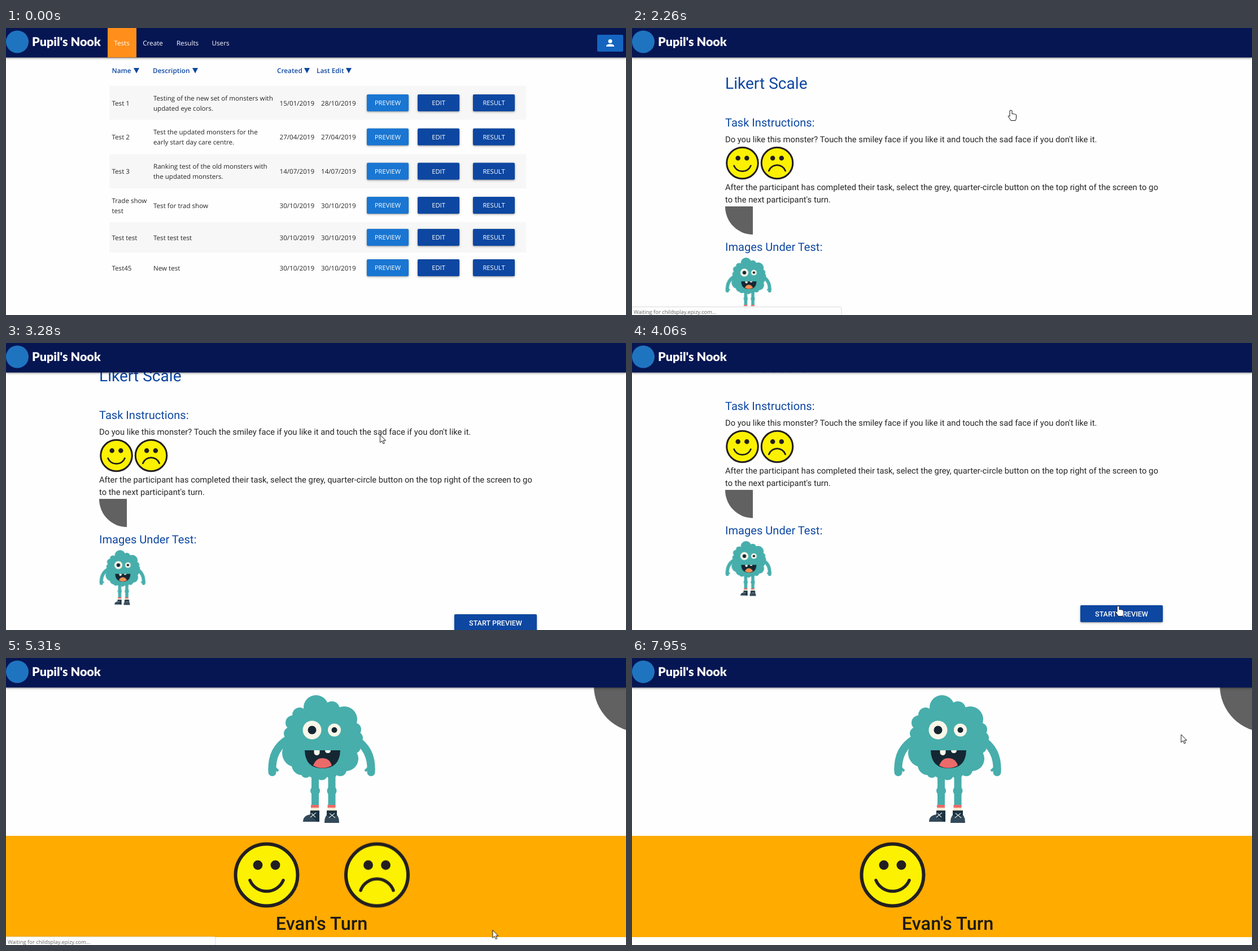
These frames come from a looping animation (1098x510 px, 8000 ms). An HTML page:

```html
<!DOCTYPE html>
<html lang="en">
<head>
<meta charset="utf-8">
<title>Test preview</title>
<style>
  html, body { margin: 0; width: 100%; height: 100%; overflow: hidden; background: #fefefe; }
  svg { display: block; width: 1098px; height: 510px; }
  text { font-family: "Open Sans", sans-serif; font-size: 11.6px; fill: #262626; text-rendering: geometricPrecision; }
  .roboto text { font-family: Roboto, sans-serif; font-size: 14.76px; }
  .mid { text-anchor: middle; }
  text.brand { font: 900 21.5px Lato, sans-serif; fill: #fff; }
  .bar { fill: #061653; filter: drop-shadow(0 1px 1px #0004) drop-shadow(0 1px 2px #0004); }
  .nav text { font-size: 11.7px; fill: #fff; }
  .head text { font-weight: 600; font-size: 11.8px; fill: #0d47a1; }
  .head path { fill: #0d47a1; }
  .btn rect { filter: drop-shadow(0 1px 1px #0004) drop-shadow(0 1px 2px #0003); }
  .btn text { font-weight: 500; font-size: 11.2px; fill: #fff; text-anchor: middle; }
  .roboto .btn text { font-size: 12.6px; }
  .roboto text.h1 { font-size: 28.1px; fill: #0d47a1; }
  .roboto text.h2 { font-size: 20.1px; fill: #0d47a1; }
  .roboto text.turn { font-size: 32.5px; font-weight: 500; fill: #1d1a14; }
  .status text { font-size: 9.4px; fill: #666; }

  .list, .task, .play, .status, .url1, .url2, .wait, .arrow, .hand, .pointer, .sad, .scroll, .hover1 {
    animation: 8s step-end infinite;
  }
  .list { animation-name: list; }
  .task { animation-name: task; }
  .play { animation-name: play; }
  .scroll { animation-name: scroll; }
  .status { animation-name: status; }
  .url1 { animation-name: url1; }
  .url2 { animation-name: url2; }
  .wait { animation-name: wait; }
  .arrow { animation-name: arrow; }
  .hand { animation-name: hand; }
  .pointer { animation-name: pointer; }
  .sad { animation-name: sad; }
  .hover1 { animation-name: hover1; }
  .hover2 { animation: hover2 8s linear infinite; }
  .path { animation: path 8s linear infinite; }

  @keyframes list { 0% { opacity: 1 } 28.25%, 100% { opacity: 0 } }
  @keyframes task { 0% { opacity: 0 } 28.25% { opacity: 1 } 64.75%, 100% { opacity: 0 } }
  @keyframes play { 0% { opacity: 0 } 64.75%, 100% { opacity: 1 } }
  @keyframes scroll {
    0% { transform: none }
    39.875% { transform: translateY(-18px) }
    41% { transform: translateY(-40px) }
    42%, 100% { transform: translateY(-56px) }
  }
  @keyframes status { 0% { opacity: 0 } 14% { opacity: 1 } 32.25% { opacity: 0 } 52.5% { opacity: 1 } 69.5%, 100% { opacity: 0 } }
  @keyframes url1 { 0% { opacity: 1 } 26.375%, 100% { opacity: 0 } }
  @keyframes url2 { 0% { opacity: 0 } 52.5% { opacity: 1 } 60.75%, 100% { opacity: 0 } }
  @keyframes wait { 0% { opacity: 0 } 26.375% { opacity: 1 } 52.5% { opacity: 0 } 60.75%, 100% { opacity: 1 } }
  @keyframes hand { 0% { opacity: 0 } 11.5% { opacity: 1 } 32.25% { opacity: 0 } 50.5% { opacity: 1 } 60.75%, 100% { opacity: 0 } }
  @keyframes arrow { 0% { opacity: 1 } 11.5% { opacity: 0 } 32.25% { opacity: 1 } 50.5% { opacity: 0 } 60.75%, 100% { opacity: 1 } }
  @keyframes pointer { 0% { opacity: 0 } 3.125%, 100% { opacity: 1 } }
  @keyframes sad { 0% { opacity: 1 } 91.75%, 100% { opacity: 0 } }
  @keyframes hover1 { 0% { fill: #1976d2 } 11.5%, 100% { fill: #ff8f1a } }
  @keyframes hover2 {
    0%, 51% { fill: #0d47a1; filter: drop-shadow(0 1px 1px #0004) drop-shadow(0 1px 2px #0003) }
    54%, 100% { fill: #ff9122; filter: drop-shadow(0 2px 2px #0004) drop-shadow(0 1px 3px #0004) }
  }
  @keyframes path {
    0%, 3.125% { transform: translate(974px, 463px); animation-timing-function: ease-out }
    11.875%, 32.25% { transform: translate(671px, 146px) }
    36.125%, 45.875% { transform: translate(662.5px, 163px); animation-timing-function: ease-out }
    50.75% { transform: translate(861px, 467px) }
    55.75%, 66% { transform: translate(866.5px, 487px) }
    70.375%, 71.5% { transform: translate(813px, 447px) }
    74.5% { transform: translate(655px, 374px) }
    77.25%, 80.2% { transform: translate(695px, 361px) }
    80.25% { transform: translate(684.5px, 359px) }
    83%, 84.875% { transform: translate(653px, 373px) }
    85.875%, 95.625% { transform: translate(651px, 376px) }
    99.375%, 100% { transform: translate(972.5px, 136px) }
  }
</style>
</head>
<body>
<svg viewBox="0 0 1098 510">
  <defs>
    <g id="face">
      <circle r="55" fill="#fbf100" stroke="#231f20" stroke-width="6"/>
      <circle cx="-15.5" cy="-17.5" r="5.7" fill="#231f20"/>
      <circle cx="15.5" cy="-17.5" r="5.7" fill="#231f20"/>
    </g>
    <g id="happy" fill="none" stroke="#231f20" stroke-width="5.5" stroke-linecap="round">
      <use href="#face"/>
      <path d="M-29.5 9.5A32 32 0 0 0 29.5 9.5"/>
    </g>
    <g id="unhappy" fill="none" stroke="#231f20" stroke-width="5.5" stroke-linecap="round">
      <use href="#face"/>
      <path d="M-29 27.5A30.800 30.800 0 0 1 29 27.5"/>
    </g>
    <g id="arm" fill="none" stroke="#47aeac">
      <path d="M500 144Q470 162 471.500 200" stroke-width="14"/>
      <path d="M471.500 196V203" stroke-width="14" stroke-linecap="round"/>
      <path d="M474 193L482 201" stroke-width="4.500"/>
    </g>
    <g id="leg">
      <path d="M541 200H554V262H541Z" fill="#47aeac"/>
      <circle cx="547.5" cy="236" r="8.5" fill="#47aeac"/>
      <path d="M540 261H554V266H540Z" fill="#ec6a6a"/>
      <path d="M540 266H554V271H540Z" fill="#f3ead0"/>
    </g>
    <g id="monster">
      <use href="#arm"/>
      <use href="#arm" transform="matrix(-1 0 0 1 1118 0)"/>
      <use href="#leg"/>
      <use href="#leg" x="29.5"/>
      <path d="M539 271H555V291H526Q526 280 539 278Z" fill="#33495a"/>
      <path d="M539 271H555V291H551L539 279Z" fill="#1d3342"/>
      <path d="M568 271H586V279Q590 283 590 293H564Q564 283 568 279Z" fill="#33495a"/>
      <path d="M568 271H586V279L577 284 568 279Z" fill="#1d3342"/>
      <path d="M539 283L549 275M541 276L548 283M573 276L583 284M582 276L572 284" fill="none" stroke="#d9e2e0" stroke-width="1.2"/>
      <g id="fluff" fill="#47aeac"><ellipse cx="559" cy="150" rx="61" ry="58"/></g>
      <circle cx="542" cy="128" r="16.500" fill="#f8f6e8"/>
      <circle cx="542" cy="128" r="7.500" fill="#152733"/>
      <circle cx="581.500" cy="128" r="11.500" fill="#f8f6e8"/>
      <circle cx="581.500" cy="128" r="5" fill="#152733"/>
      <path d="M529 164H592Q591 196 560.500 196Q530 196 529 164Z" fill="#152733"/>
      <path d="M544 191Q549 178 560 178Q573 178 577 191Q560 200 544 191Z" fill="currentColor"/>
      <path d="M545.500 164H555.500V168A5 5 0 0 1 545.500 168ZM565 164H575Q575 169 570 169Q565 169 565 164Z" fill="#f8f6e8"/>
    </g>
  </defs>

  <rect width="1098" height="510" fill="#fefefe"/>

  <g class="list">
    <g class="head" id="head"></g>
    <g id="rows"></g>
  </g>

  <g class="task roboto">
    <g class="scroll">
      <text class="h1" x="165" y="108">Likert Scale</text>
      <text class="h2" x="165" y="175">Task Instructions:</text>
      <text x="165" y="203">Do you like this monster? Touch the smiley face if you like it and touch the sad face if you don't like it.</text>
      <use href="#happy" transform="translate(195.5 240) scale(.505)"/>
      <use href="#unhappy" transform="translate(257 240) scale(.505)"/>
      <text x="165" y="288">After the participant has completed their task, select the grey, quarter-circle button on the top right of the screen to go</text>
      <text x="165" y="310">to the next participant's turn.</text>
      <path d="M165 317H214V367A49 50 0 0 1 165 317Z" fill="#616161"/>
      <text class="h2" x="165" y="396">Images Under Test:</text>
      <use href="#monster" color="#f58f55" transform="translate(-33 379.600) scale(.428 .430)"/>
      <g class="btn">
        <rect class="hover2" x="794" y="522" width="146" height="30" rx="2"/>
        <text x="867" y="541.500">START PREVIEW</text>
      </g>
    </g>
  </g>

  <g class="play roboto">
    <circle cx="1124" cy="49" r="83" fill="#616161"/>
    <use href="#monster" color="#ec6a6a"/>
    <rect y="316" width="1098" height="180" fill="#ffab00"/>
    <use href="#happy" x="461.500" y="385.500"/>
    <use class="sad" href="#unhappy" x="657" y="385.500"/>
    <text class="turn mid" x="559" y="483">Evan's Turn</text>
  </g>

  <rect class="bar" width="1098" height="52.400"/>
  <circle cx="20" cy="24.500" r="20" fill="#1f74c0"/>
  <text class="brand" x="46" y="32">Pupil's Nook</text>
  <g class="list nav">
    <rect x="180" width="51" height="52.400" fill="#ff8f1a"/>
    <text class="mid" x="205" y="31">Tests</text>
    <text class="mid" x="260" y="31">Create</text>
    <text class="mid" x="321.500" y="31">Results</text>
    <text class="mid" x="380" y="31">Users</text>
    <rect x="1047" y="12" width="46" height="30" rx="2" fill="#1565c0"/>
    <circle cx="1070" cy="23.500" r="3.500" fill="#fff"/>
    <path d="M1063 33V31.500Q1064 28.500 1070 28.500T1077 31.500V33Z" fill="#fff"/>
  </g>

  <g class="status">
    <path d="M-1 511V495.500H368Q371 495.500 371 498.500V511Z" fill="#fdfdfd" stroke="#dadada"/>
    <text class="url1" x="3" y="507.500">childsplay.epizy.com/instruction.php?testID=1&amp;mode=preview&amp;from=existingTests</text>
    <text class="url2" x="3" y="507.500">childsplay.epizy.com/likertScale.php?testID=1&amp;mode=preview&amp;from=existingTests</text>
    <text class="wait" x="3" y="507.500">Waiting for childsplay.epizy.com...</text>
  </g>

  <g class="pointer"><g class="path" fill="#fff" stroke="#111" stroke-linejoin="round">
    <path class="arrow" d="M0 0V14L3.300 11 5.500 16 7.800 15 5.700 10.200H10Z"/>
    <path class="hand" d="M-2 1Q0-1 2 1V7Q3.500 5.500 5 7Q6.500 6 7.500 7.500Q9.500 7 9.500 9V13Q9.500 16 8 18.500H0Q-2 15-5 11Q-4 9-2 11Z"/>
  </g></g>
</svg>

<script>
  const $ = id => document.getElementById(id);
  const label = (x, y, s, cls = '') => `<text class="${cls}" x="${x}" y="${y}">${s}</text>`;

  const columns = [['Name', 187.5, 226], ['Description', 260, 330], ['Created', 480, 528], ['Last Edit', 550, 602]];
  $('head').innerHTML = columns.map(([name, x, tri]) =>
    label(x, 80, name) + `<path d="M${tri} 71h10l-5 9.500z"/>`).join('');

  const button = (x, y, name, fill, cls = '') =>
    `<g class="btn"><rect class="${cls}" x="${x}" y="${y - 15}" width="74" height="30" rx="2" fill="${fill}"/>` +
    label(x + 37, y + 4, name) + '</g>';

  // One or two lines, centred on y.
  const lines = (x, y, text) => {
    const parts = text.split('|');
    return parts.map((s, i) => label(x, y + 4.5 + 18 * (i - (parts.length - 1) / 2), s)).join('');
  };

  const rows = [
    [103, 60, 'Test 1', 'Testing of the new set of monsters with|updated eye colors.', '15/01/2019', '28/10/2019'],
    [163, 61, 'Test 2', 'Test the updated monsters for the|early start day care centre.', '27/04/2019', '27/04/2019'],
    [224, 61, 'Test 3', 'Ranking test of the old monsters with|the updated monsters.', '14/07/2019', '14/07/2019'],
    [285, 60, 'Trade show|test', 'Test for trad show', '30/10/2019', '30/10/2019'],
    [345, 54, 'Test test', 'Test test test', '30/10/2019', '30/10/2019'],
    [399, 54, 'Test45', 'New test', '30/10/2019', '30/10/2019'],
  ];
  $('rows').innerHTML = rows.map(([top, h, name, about, made, edited], i) => {
    const y = top + h / 2;
    return (i % 2 ? '' : `<rect x="183" y="${top}" width="738" height="${h}" fill="#f7f7f7"/>`) +
      lines(187.5, y, name) + lines(261, y, about) + lines(484.5, y, made) + lines(558, y, edited) +
      button(639, y, 'PREVIEW', '#1976d2', i ? '' : 'hover1') +
      button(729, y, 'EDIT', '#0d47a1') + button(827, y, 'RESULT', '#0d47a1');
  }).join('');

  const tufts = [
    [549, 88, 22], [577, 91, 14], [599, 109, 23], [520, 101, 13], [508, 115, 13], [503, 134, 11],
    [514, 169, 25], [524, 190, 18], [545, 201, 12], [531, 204, 9], [559, 206, 11], [576, 203, 11],
    [592, 199, 11], [602, 179, 22], [617, 127, 12], [621, 142, 11], [616, 158, 12],
  ];
  $('fluff').innerHTML += tufts.map(([x, y, r]) => `<circle cx="${x}" cy="${y}" r="${r}"/>`).join('');
</script>
</body>
</html>
```
